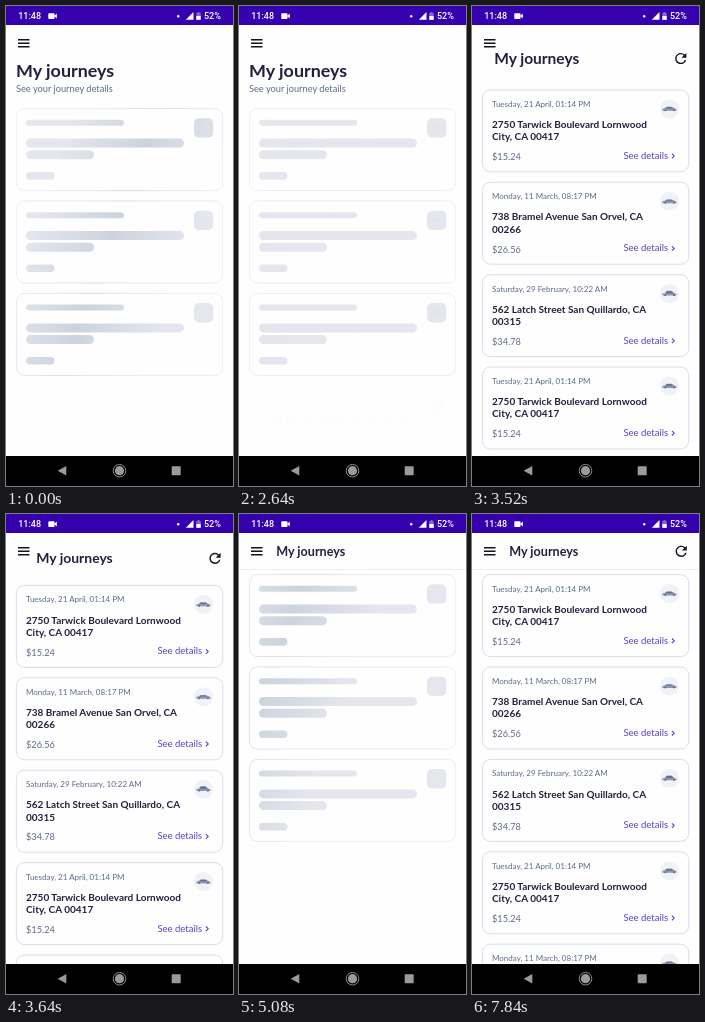
Recreate the animation shown at these times as an HTML page. Size 227 by 480 pixels, loop 10000 ms.

```html
<!DOCTYPE html>
<html lang="en">
<head>
<meta charset="utf-8">
<title>My journeys</title>
<style>
  html, body { margin: 0; width: 100%; height: 100%; overflow: hidden; background: #fdfefd; }
  svg { display: block; width: 100%; height: 100%; font-family: Lato, sans-serif; }
  .status { font: 500 9px Roboto, sans-serif; fill: #fff; }
  .title { font-weight: 700; fill: #23203f; }
  .subtitle { font-size: 9.25px; fill: #5d6a89; }
  .date { font-size: 8px; fill: #5d6a89; }
  .address { font-size: 10px; font-weight: 700; fill: #23203f; }
  .price { font-size: 9.2px; fill: #5d6a89; }
  .link { font-size: 9.5px; fill: #5443c4; }
</style>
</head>
<body>
<svg viewBox="0 0 227 480">
  <defs>
    <linearGradient id="shimmer" gradientUnits="userSpaceOnUse" x1="-80" x2="80" y1="0" y2="0">
      <stop offset="0" stop-color="#e5e6ee"/>
      <stop offset=".5" stop-color="#cdd3de"/>
      <stop offset="1" stop-color="#e5e6ee"/>
    </linearGradient>
    <mask id="placeholders" maskUnits="userSpaceOnUse" x="0" y="90" width="227" height="290" fill="#fff"></mask>
  </defs>
  <rect width="227" height="480" fill="#fdfefd"/>

  <g id="skeleton"><rect y="90" width="227" height="290" fill="url(#shimmer)" mask="url(#placeholders)"/></g>
  <g id="list"></g>

  <path id="divider" d="M0 55.5H227" stroke="#eceef2"/>
  <path d="M12 33.7h11.5M12 37.2h11.5M12 40.7h11.5" stroke="#15131f" stroke-width="1.5"/>
  <text id="title" class="title">My journeys</text>
  <text id="subtitle" class="subtitle" x="10">See your journey details</text>
  <path id="refresh" fill="#15131f" d="M17.65 6.35A7.96 7.96 0 0 0 12 4c-4.42 0-7.99 3.58-7.99 8s3.57 8 7.99 8c3.73 0 6.84-2.55 7.73-6h-2.08A5.99 5.99 0 0 1 12 18c-3.31 0-6-2.69-6-6s2.69-6 6-6c1.66 0 3.14.69 4.22 1.78L13 11h7V4z"/>

  <rect width="227" height="19" fill="#3500ae"/>
  <g fill="#fff">
    <text class="status" x="12.2" y="13.3">11:48</text>
    <rect x="42.3" y="7.2" width="6.2" height="5.8" rx=".8"/>
    <path d="M48 10l2.8-2.5v5z"/>
    <circle cx="172.2" cy="10.2" r="1.2"/>
    <path d="M187.5 6v7.7h-7.7z"/>
    <path d="M190.3 7h1.2V6h2v1h1.2v6.8h-4.4z" opacity=".4"/>
    <rect x="190.3" y="10" width="4.4" height="3.8"/>
    <text class="status" x="198" y="13.3">52%</text>
  </g>

  <rect y="450" width="227" height="30"/>
  <g fill="#9b9b9b">
    <path d="M60.3 460v9.4l-8.6-4.7z"/>
    <circle cx="113.5" cy="464.7" r="4.6"/>
    <circle cx="113.5" cy="464.7" r="6.3" fill="none" stroke="#9b9b9b" stroke-width=".9"/>
    <rect x="165.7" y="460.2" width="9" height="9" rx=".6"/>
  </g>
</svg>
<script>
const LOOP = 10000, SCROLL = 42, FIRST_TOP = 102.3, PITCH = 92.4;
const $ = id => document.getElementById(id);

const journeys = [
  { date: 'Tuesday, 21 April, 01:14 PM', address: ['2750 Tarwick Boulevard Lornwood', 'City, CA 00417'], price: '$15.24', roof: 1.7 },
  { date: 'Monday, 11 March, 08:17 PM', address: ['738 Bramel Avenue San Orvel, CA', '00266'], price: '$26.56', roof: 1.2 },
  { date: 'Saturday, 29 February, 10:22 AM', address: ['562 Latch Street San Quillardo, CA', '00315'], price: '$34.78', roof: 2.4 },
];

const text = (style, x, y, value) => `<text class="${style}" x="${x}" y="${y}">${value}</text>`;
const pill = (x, y, w, h, r = h / 2) => `<rect x="${x}" y="${y}" width="${w}" height="${h}" rx="${r}"/>`;
const card = (i, stroke, body) => `<g transform="translate(0 ${FIRST_TOP + i * PITCH})">
  <rect x="10.4" y=".3" width="206.3" height="82" rx="8" fill="none" stroke="${stroke}" stroke-width=".7"/>${body}</g>`;

const car = roof => `<circle cx="197.5" cy="19.3" r="9.6" fill="#f1f2f7"/>
  <path d="M190.4 19.2l2.2-.4 2-${roof}h5l3 ${roof} 1.9.8v1.6h-14.1z" fill="#8e98b0"/>
  <path d="M193.6 18.9l1.4-${roof * 0.8}h4.2l2.2 ${roof * 0.8}z" fill="#626d8c"/>
  <circle cx="193.3" cy="20.8" r=".9" fill="#56617f"/><circle cx="201.9" cy="20.8" r=".9" fill="#56617f"/>`;

const journeyCard = (j, i) => card(i, '#ccd2de',
  text('date', 20, 17.3, j.date) +
  text('address', 20, 38.5, j.address[0]) +
  text('address', 20, 50.7, j.address[1]) +
  text('price', 20, 70.6, j.price) +
  text('link', 151.4, 69.4, 'See details') + car(j.roof) +
  '<path d="M199.9 64.2l2.3 2.3-2.3 2.3" fill="none" stroke="#5443c4" stroke-width="1.1"/>');

const placeholder = pill(20, 11.5, 98, 6) + pill(20, 30.3, 158, 9) + pill(20, 42, 68, 9) +
  pill(20, 63.8, 28.5, 7.6) + pill(188, 10, 19.3, 19.3, 5);

$('placeholders').innerHTML = [0, 1, 2].map(i => card(i, '#fff', placeholder)).join('');
$('list').innerHTML = [0, 1, 2, 3, 4].map(i => journeyCard(journeys[i % 3], i)).join('');

const clamp = v => Math.min(1, Math.max(0, v));
const ramp = (t, from, to) => clamp((t - from) / (to - from));
const mix = (a, b, p) => a + (b - a) * p;

// The band crosses the list once a second; each load has its own starting phase.
function bandOffset(t) {
  const phase = t < 4000 ? t + 485 : Math.max(0, t - 4716);
  return mix(-330, 330, phase % 1000 / 1000);
}

function draw(t) {
  const collapse = ramp(t, 3340, 3745);
  const shown = t < 4560 ? ramp(t, 2640, 2760) : ramp(t, 7720, 7840);
  const shift = `translate(0 ${-SCROLL * collapse})`;
  const headY = mix(65, 37.5, collapse);

  $('skeleton').setAttribute('transform', shift);
  $('skeleton').setAttribute('opacity', 1 - shown);
  $('list').setAttribute('transform', shift);
  $('list').setAttribute('opacity', shown);
  $('shimmer').setAttribute('gradientTransform', `translate(113.5 236) rotate(20) translate(${bandOffset(t)} 0)`);

  const size = mix(17.9, 12.6, collapse);
  $('title').setAttribute('x', mix(10, 37.2, collapse));
  $('title').setAttribute('y', headY + size * 0.34);
  $('title').setAttribute('font-size', size);
  $('subtitle').setAttribute('y', mix(85.6, 58, collapse));
  $('subtitle').setAttribute('opacity', clamp(1 - 4 * collapse));
  $('divider').setAttribute('opacity', ramp(collapse, 0.85, 1));
  $('refresh').setAttribute('transform', `translate(${mix(200, 200.8, collapse)} ${headY - 8.6}) scale(.7)`);
  $('refresh').setAttribute('opacity', shown);
}

function frame() {
  draw(performance.now() % LOOP);
  requestAnimationFrame(frame);
}
frame();
</script>
</body>
</html>
```
